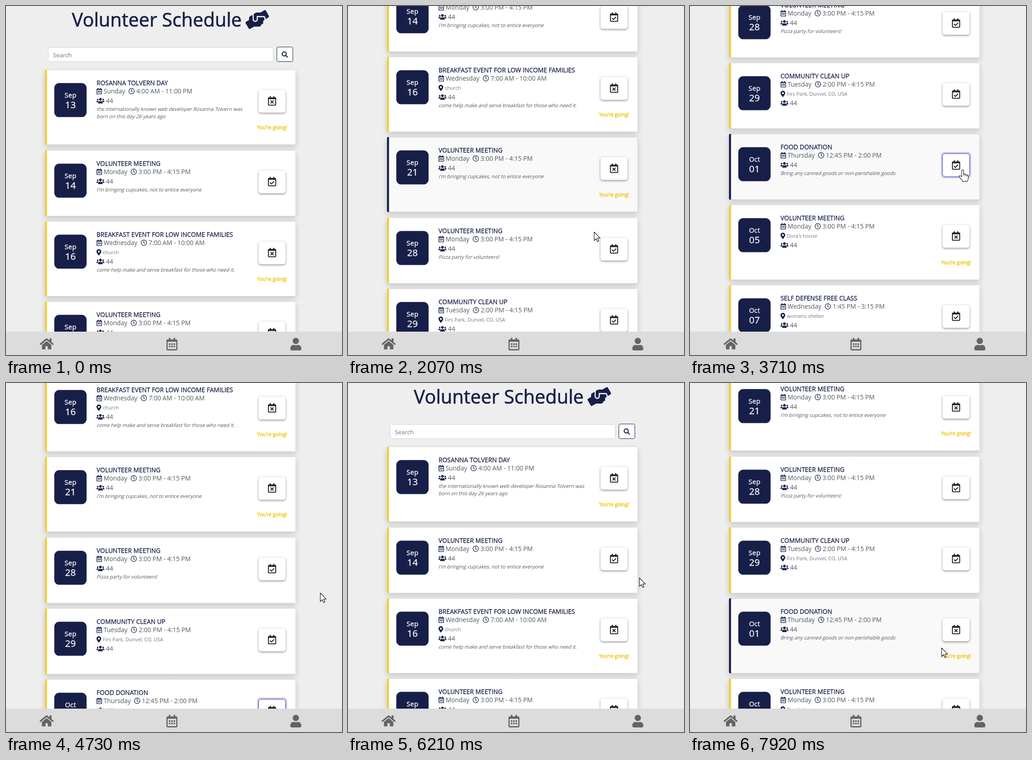
These frames come from a looping animation (735x762 px, 8 s). An HTML page with a canvas:

```html
<!DOCTYPE html>
<html lang="en">
<head>
<meta charset="utf-8">
<title>Volunteer Schedule</title>
<style>
html, body { margin: 0; width: 100%; height: 100%; overflow: hidden; background: #eee; }
canvas { display: block; width: 735px; height: 762px; }
</style>
</head>
<body>
<canvas id="stage" width="735" height="762"></canvas>
<script>
const ctx = document.getElementById('stage').getContext('2d');
const LOOP = 8000, REM = 13.7, NOTCH = 85.16;
const NAVY = '#171f49', GOLD = '#f0cf33', INK = '#55585c';
const SANS = '"Open Sans", "Noto Sans", sans-serif';

// Icons on a 512-unit grid: f = filled path, l = stroked path of width w
const FRAME = 'M400 64h-48V12c0-6.6-5.4-12-12-12h-40c-6.6 0-12 5.4-12 12v52H160V12c0-6.6-5.4-12-12-12h-40c-6.6 0-12 5.4-12 12v52H48C21.5 64 0 85.5 0 112v352c0 26.5 21.5 48 48 48h352c26.5 0 48-21.5 48-48V112c0-26.5-21.5-48-48-48zm-6 400H54c-3.3 0-6-2.7-6-6V160h352v298c0 3.3-2.7 6-6 6z';
const dots = [224, 320].flatMap(y => [96, 192, 288].map(x => `M${x} ${y}h64v64h-64z`)).join('');
const icons = {
  cal: { f: FRAME + dots },
  check: { f: FRAME, l: 'M124 322L190 388L324 255', w: 50 },
  times: { f: FRAME, l: 'M160 248L288 376M288 248L160 376', w: 52 },
  clock: { l: 'M480 256A224 224 0 1 1 32 256A224 224 0 1 1 480 256M256 116V268L334 324', w: 48 },
  search: { l: 'M376 208A168 168 0 1 1 40 208A168 168 0 1 1 376 208M335 335L476 476', w: 80 },
  pin: { f: 'M172.3 501.7C27 291 0 269.4 0 192 0 86 86 0 192 0s192 86 192 192c0 77.4-27 99-172.3 309.7-9.5 13.8-29.9 13.8-39.5 0zM192 272c44.2 0 80-35.8 80-80s-35.8-80-80-80-80 35.8-80 80 35.8 80 80 80z' },
  users: { f: 'M96 224c35.3 0 64-28.7 64-64s-28.7-64-64-64-64 28.7-64 64 28.7 64 64 64zm448 0c35.3 0 64-28.7 64-64s-28.7-64-64-64-64 28.7-64 64 28.7 64 64 64zm32 32h-64c-17.6 0-33.5 7.1-45.1 18.6 40.3 22.1 68.9 62 75.1 109.4h66c17.7 0 32-14.3 32-32v-32c0-35.3-28.7-64-64-64zm-256 0c61.9 0 112-50.1 112-112S381.9 32 320 32 208 82.1 208 144s50.1 112 112 112zm76.8 32h-8.3c-20.8 10-43.9 16-68.5 16s-47.6-6-68.5-16h-8.3C179.6 288 128 339.6 128 403.2V432c0 26.5 21.5 48 48 48h288c26.5 0 48-21.5 48-48v-28.8c0-63.6-51.6-115.2-115.2-115.2zm-223.7-13.4C161.5 263.1 145.6 256 128 256H64c-35.3 0-64 28.7-64 64v32c0 17.7 14.3 32 32 32h65.9c6.3-47.4 34.9-87.3 75.2-109.4z' },
  hands: { f: 'M488 192H336v56c0 39.7-32.3 72-72 72s-72-32.3-72-72V126.4l-64.9 39C107.8 176.9 96 197.8 96 220.2v47.3l-80 46.2C.7 322.5-4.6 342.1 4.3 357.4l80 138.6c8.8 15.3 28.4 20.5 43.7 11.7L231.4 448H368c35.3 0 64-28.7 64-64h16c17.7 0 32-14.3 32-32v-64h8c13.3 0 24-10.7 24-24v-48c0-13.3-10.7-24-24-24zm147.7-37.4L555.7 16C546.9.7 527.3-4.5 512 4.3L408.6 64H306.4c-12 0-23.7 3.4-33.9 9.7L239 94.6c-9.4 5.8-15 16.1-15 27.1V248c0 22.1 17.9 40 40 40s40-17.9 40-40v-88h184c30.9 0 56 25.1 56 56v28.5l80-46.2c15.3-8.9 20.5-28.4 11.7-43.7z' },
  home: { f: 'M280.4 148.3L96 300.1V464a16 16 0 0 0 16 16l112.1-.3a16 16 0 0 0 15.9-16V368a16 16 0 0 1 16-16h64a16 16 0 0 1 16 16v95.6a16 16 0 0 0 16 16.1L464 480a16 16 0 0 0 16-16V300L295.7 148.3a12.2 12.2 0 0 0-15.3 0zM571.6 251.5L488 182.6V44.1a12 12 0 0 0-12-12h-56a12 12 0 0 0-12 12v72.6L318.5 43a48 48 0 0 0-61 0L4.3 251.5a12 12 0 0 0-1.6 16.9l25.5 31A12 12 0 0 0 45.2 301l235.2-193.7a12.2 12.2 0 0 1 15.3 0L530.9 301a12 12 0 0 0 16.9-1.6l25.5-31a12 12 0 0 0-1.7-16.9z' },
  user: { f: 'M224 256c70.7 0 128-57.3 128-128S294.7 0 224 0 96 57.3 96 128s57.3 128 128 128zm89.6 32h-16.7c-22.2 10.2-46.9 16-72.9 16s-50.6-5.8-72.9-16h-16.7C60.2 288 0 348.2 0 422.4V464c0 26.5 21.5 48 48 48h352c26.5 0 48-21.5 48-48v-41.6c0-74.2-60.2-134.4-134.4-134.4z' }
};
for (const i of Object.values(icons)) {
  if (i.f) i.f = new Path2D(i.f);
  if (i.l) i.l = new Path2D(i.l);
}
const arrow = new Path2D('M0 0V17.5L4.1 13.7L6.8 19.8L9.5 18.6L6.9 12.6H12.4Z');
const hand = new Path2D('M-2 2Q-2 0 0 0Q2 0 2 2V9Q4.5 8 5.5 10Q8 9 8.8 11Q11.5 10.5 11.5 13V18Q11.5 20.5 9.5 24H0Q-1.5 21 -6.5 15.5Q-8.5 12.5 -6 12Q-4 12 -2 14.5Z');
const knuckles = new Path2D('M2 9V12M5.5 10V13M8.8 11V14');

const cupcakes = ["I'm bringing cupcakes, not to entice everyone"];
const afternoon = '3:00 PM - 4:15 PM';
// going: true, false, or the time at which it is switched on
const events = [
  { date: 'Sep 13', title: 'ROSANNA TOLVERN DAY', day: 'Sunday', time: '4:00 AM - 11:00 PM', going: true,
    note: ['the internationally known web developer Rosanna Tolvern was', 'born on this day 26 years ago'] },
  { date: 'Sep 14', title: 'VOLUNTEER MEETING', day: 'Monday', time: afternoon, going: 6670, note: cupcakes },
  { date: 'Sep 16', title: 'BREAKFAST EVENT FOR LOW INCOME FAMILIES', day: 'Wednesday', time: '7:00 AM - 10:00 AM',
    place: 'church', going: true, note: ['come help make and serve breakfast for those who need it.'] },
  { date: 'Sep 21', title: 'VOLUNTEER MEETING', day: 'Monday', time: afternoon, going: true, note: cupcakes },
  { date: 'Sep 28', title: 'VOLUNTEER MEETING', day: 'Monday', time: afternoon, going: false, note: ['Pizza party for volunteers!'] },
  { date: 'Sep 29', title: 'COMMUNITY CLEAN UP', day: 'Tuesday', time: '2:00 PM - 4:15 PM', place: 'Firs Park, Dunvel, CO, USA', going: false },
  { date: 'Oct 01', title: 'FOOD DONATION', day: 'Thursday', time: '12:45 PM - 2:00 PM', going: 3880,
    note: ['Bring any canned goods or non-perishable goods'] },
  { date: 'Oct 05', title: 'VOLUNTEER MEETING', day: 'Monday', time: afternoon, place: "Dora's house", going: true },
  { date: 'Oct 07', title: 'SELF DEFENSE FREE CLASS', day: 'Wednesday', time: '1:45 PM - 3:15 PM', place: 'womens shelter', going: false }
];

// Screen updates: start, end, number of steps
const bursts = [
  [970, 1430, 7], [1610, 2370, 11], [2450, 2450, 1], [2680, 3480, 11], [3550, 3710, 3],
  [3880, 4680, 11], [4730, 4890, 3], [5130, 5430, 5], [5680, 6370, 10], [6520, 6520, 1],
  [6670, 6670, 1], [6930, 7550, 9], [7690, 7920, 4]
];
// time, wheel notches
const scrollKeys = [[0, 0], [1560, 0], [2450, 7], [2640, 7], [3100, 10], [4200, 10], [4890, 5], [5080, 5],
  [5430, 3], [5640, 3], [6000, 0], [7230, 0], [7550, 4.5], [7650, 4.5], [7843, 8]];
// time, x, y
const mouseKeys = [[970, 646, 742], [1430, 538, 493], [2150, 538, 493], [2450, 509, 497], [2950, 509, 497],
  [3480, 596, 357], [3900, 596, 357], [4260, 687, 458], [5130, 687, 458], [5430, 683, 461], [5900, 683, 461],
  [6370, 593, 391], [6900, 593, 391], [7240, 490, 444], [7690, 490, 444], [7920, 550, 578]];
// time, card index
const hoverKeys = [[0, -1], [1200, 2], [2000, 3], [2680, 5], [3050, 7], [3250, 6], [4050, -1],
  [6180, 1], [7690, 3], [7843, 6]];
const focusKeys = [[0, -1], [3550, 6], [6520, 1]];

function lastUpdate(t) {
  let s = 0;
  for (const [a, b, n] of bursts) {
    if (t < a) break;
    s = n > 1 ? a + Math.floor(Math.min(1, (t - a) / (b - a)) * (n - 1) + 1e-6) * (b - a) / (n - 1) : a;
  }
  return s;
}

const held = (keys, t) => keys.filter(k => k[0] <= t + 0.5).pop()[1];

function eased(keys, t, c = 1) {
  const i = keys.findIndex(k => k[0] > t);
  if (i < 0) return keys[keys.length - 1][c];
  if (i === 0) return keys[0][c];
  const a = keys[i - 1], b = keys[i];
  const u = (t - a[0]) / (b[0] - a[0]);
  return a[c] + (b[c] - a[c]) * u * u * (3 - 2 * u);
}

function text(str, x, y, size, color, { align = 'left', bold = 0, slant = 0 } = {}) {
  ctx.save();
  ctx.transform(1, 0, -slant, 1, x, y);
  ctx.font = `400 ${size}px ${SANS}`;
  ctx.textAlign = align;
  ctx.fillStyle = ctx.strokeStyle = color;
  ctx.fillText(str, 0, 0);
  if (bold) {
    ctx.lineWidth = bold;
    ctx.lineJoin = 'round';
    ctx.strokeText(str, 0, 0);
  }
  const { width } = ctx.measureText(str);
  ctx.restore();
  return width;
}

function icon(name, x, y, size, color) {
  const { f, l, w } = icons[name];
  ctx.save();
  ctx.translate(x, y);
  ctx.scale(size / 512, size / 512);
  ctx.fillStyle = ctx.strokeStyle = color;
  if (f) ctx.fill(f, 'evenodd');
  if (l) {
    ctx.lineWidth = w;
    ctx.lineCap = ctx.lineJoin = 'round';
    ctx.stroke(l);
  }
  ctx.restore();
}

function box(x, y, w, h, r, fill, { line, shadow } = {}) {
  ctx.save();
  if (shadow) [ctx.shadowOffsetY, ctx.shadowBlur, ctx.shadowColor] = shadow;
  ctx.beginPath();
  ctx.roundRect(x, y, w, h, r);
  ctx.fillStyle = fill;
  ctx.fill();
  ctx.restore();
  if (!line) return;
  ctx.beginPath();
  ctx.roundRect(x + 0.5, y + 0.5, w - 1, h - 1, r);
  ctx.strokeStyle = line;
  ctx.lineWidth = 1;
  ctx.stroke();
}

function header(y) {
  text('Volunteer Schedule', 144, y + 45, 3 * REM, NAVY, { bold: 0.7 });
  icon('hands', 524, y + 9, 3 * REM, NAVY);
  box(92, y + 90, 493, 32, 3, '#fff', { line: '#ced4da' });
  text('Search', 102.5, y + 112, 13.2, '#6c757d');
  box(592, y + 89, 36, 33, 3, '#fff', { line: NAVY });
  icon('search', 603, y + 99, REM, NAVY);
}

function button(y, going, focused, t) {
  if (focused) {
    const fresh = t < 3880;
    if (t !== 6520) box(549, y - 3, 66, 57, 8, 'rgba(85,95,205,.35)');
    box(552, y, 60, 51, 6, '#fff', { line: fresh ? '#4653c4' : '#3d4388' });
  } else {
    box(552, y, 60, 51, 6, '#fff', { shadow: [2, 4, 'rgba(0,0,0,.38)'], line: 'rgba(0,0,0,.08)' });
  }
  icon(going ? 'times' : 'check', 573, y + 15, 1.5 * REM, '#212529');
}

function card(e, y, h, going, hovered, focused, t) {
  box(85, y, 549, h, 3, hovered ? '#f9f9f9' : '#fff',
    { shadow: [5, 13, 'rgba(0,0,0,.16)'], line: 'rgba(0,0,0,.12)' });
  box(85.3, y, 4.4, h, [3, 0, 0, 3], hovered ? NAVY : GOLD);

  box(105.6, y + 29.2, 70.7, 74.4, 11, NAVY);
  const [month, num] = e.date.split(' ');
  const white = { align: 'center', bold: 0.3 };
  text(month, 141, y + 61, 1.1 * REM, '#fff', white);
  text(num, 141, y + 84, 1.5 * REM, '#fff', white);

  const gap = REM * 0.26, x = 198;
  text(e.title, x, y + 34, REM, NAVY, { bold: 0.3 });
  icon('cal', x, y + 40, REM, NAVY);
  let at = x + REM * 0.875 + gap;
  at += text(e.day, at, y + 52, REM, INK) + 2 * gap;
  icon('clock', at, y + 40, REM, NAVY);
  text(e.time, at + REM + gap, y + 52, REM, INK);

  let row = y + 73;
  if (e.place) {
    icon('pin', x, row - 12, REM, NAVY);
    text(e.place, x + REM * 0.75 + gap, row - 1, REM * 0.8, '#74787d');
    row += 20;
  }
  icon('users', x, row - 12, REM, NAVY);
  text('44', x + REM * 1.25 + gap, row, REM, INK);
  (e.note || []).forEach((s, i) =>
    text(s, x, row + 17 + 16 * i, REM * 0.8, INK, { slant: 0.25 }));

  button(y + 43, going, focused, t);
  if (going) text("You're going!", 582, y + 130, REM * 0.8, GOLD, { align: 'center', bold: 0.8 });
}

function navBar() {
  ctx.fillStyle = '#dcdcdc';
  ctx.fillRect(0, 711, 735, 51);
  const size = 2 * REM, tone = '#646464';
  icon('home', 73.5, 724, size, tone);
  icon('cal', 351, 724.5, size, tone);
  icon('user', 622, 724.5, size, tone);
}

function pointer(x, y, overButton) {
  ctx.save();
  ctx.translate(x + 0.5, y + 0.5);
  ctx.scale(1.06, 1.06);
  ctx.fillStyle = '#fff';
  ctx.strokeStyle = '#1c1c28';
  ctx.lineWidth = 1.1;
  ctx.lineJoin = 'round';
  const shape = overButton ? hand : arrow;
  ctx.fill(shape);
  ctx.stroke(shape);
  if (overButton) ctx.stroke(knuckles);
  ctx.restore();
}

function draw(t) {
  const scroll = eased(scrollKeys, t) * NOTCH;
  const mx = Math.round(eased(mouseKeys, t, 1)), my = Math.round(eased(mouseKeys, t, 2));
  const hover = held(hoverKeys, t), focus = held(focusKeys, t);
  let overButton = false, top = 139.3 - scroll;

  ctx.fillStyle = '#eee';
  ctx.fillRect(0, 0, 735, 762);
  header(Math.round(-scroll));
  events.forEach((e, i) => {
    const going = typeof e.going === 'number' ? t >= e.going : e.going;
    const y = Math.round(top), h = going ? 164 : 144;
    if (y < 762 && y + h > -20) card(e, y, h, going, i === hover, i === focus, t);
    if (mx > 552 && mx < 612 && my > y + 43 && my < y + 94) overButton = true;
    top += going ? 175.4 : 155;
  });
  navBar();
  if (t >= 970) pointer(mx, my, overButton);
}

const start = performance.now();
function tick() {
  draw(lastUpdate((performance.now() - start) % LOOP));
  requestAnimationFrame(tick);
}
tick();
</script>
</body>
</html>
```
